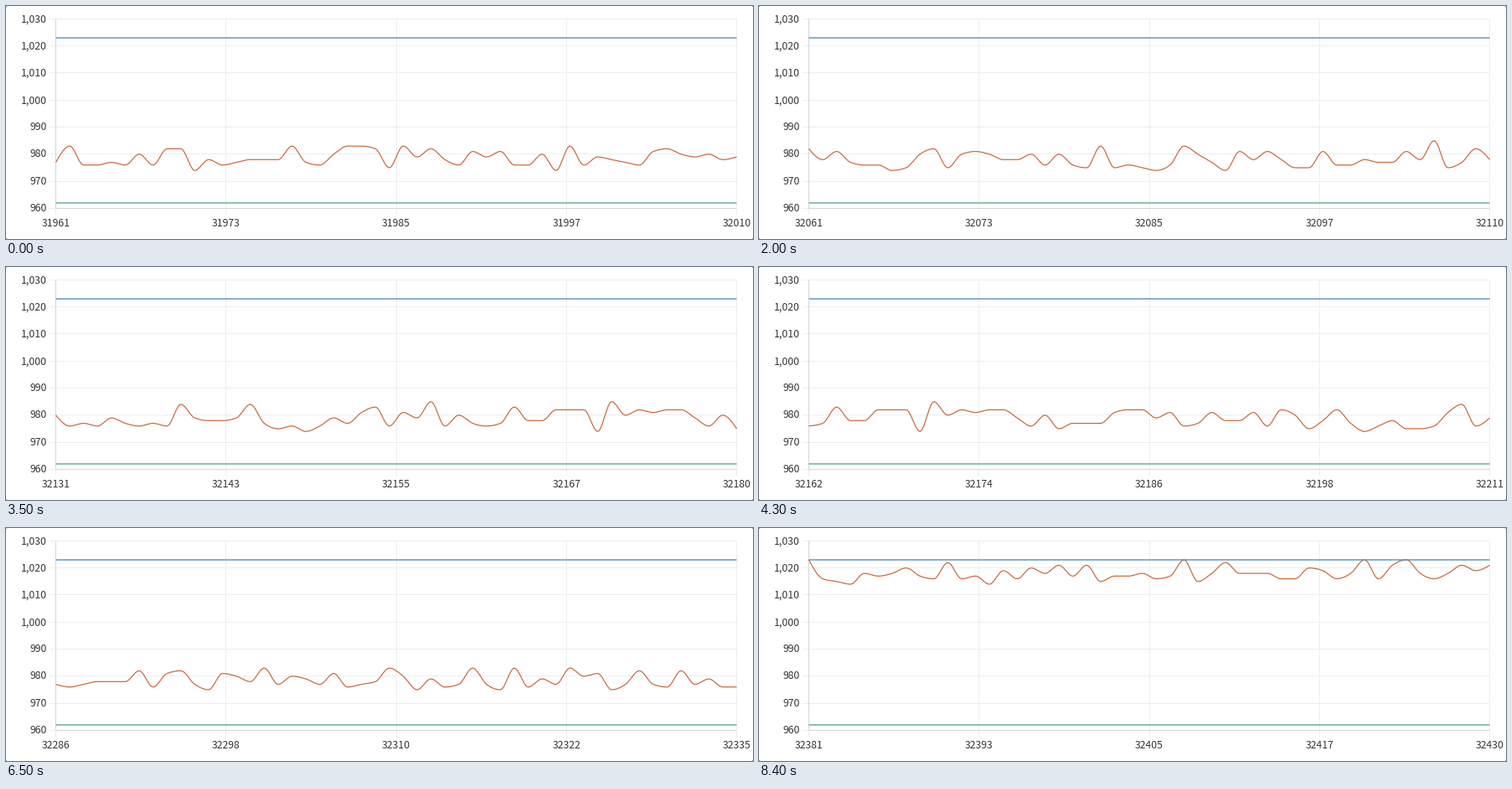
Write a matplotlib script that moves like this. It is 892x278 px and loops after 8.5 s.

```python
import numpy as np
import matplotlib.pyplot as plt
from matplotlib.animation import FuncAnimation
from matplotlib.patches import FancyBboxPatch

W, H, DPI = 892, 278, 64
PX = 72 / DPI                      # points per pixel
LEFT, RIGHT, TOP, BOTTOM = 59.5, 872.5, 15.4, 241.4
FRAMES, INTERVAL = 85, 100
FIRST, SPAN, COUNT = 31961, 49, 470
LOW, HIGH = 962, 1023              # limit lines
GRID, AXIS, INK = "#ebeeef", "#d3d7da", "#333538"
BLUE, ORANGE, GREEN = "#4a88b0", "#c8673a", "#52a28b"

plt.rcParams["font.family"] = "Noto Sans CJK JP"


def build_readings():
    """Sensor noise around a resting level that jumps up near the end."""
    rng = np.random.default_rng(12)
    k = np.arange(COUNT)
    level = np.interp(k, [399, 400, 401, 402, 403, 406],
                      [978, 982, 999, 1008, 1003, 1018])
    noise = rng.triangular(-4.4, -1.5, 7.4, COUNT)
    noise[(k >= 400) & (k <= 406)] = 0
    return np.minimum(np.rint(level + noise), HIGH)


def window_start(frame):
    """Sample at the left edge: about five per tick, with two short stalls."""
    ticks = [0, 13, 26, 32, 33, 37, 38, 43, 55, 84]
    shift = [0, 66, 130, 160, 160, 180, 180, 201, 275, 420]
    return int(round(np.interp(frame, ticks, shift)))


def y_px(value):
    return TOP + (1030 - value) * (BOTTOM - TOP) / 70


def crisp(pos):
    """Centre of the pixel that holds pos."""
    return np.floor(pos) + 0.5


def monotone(v, sub=12):
    """Monotone cubic through evenly spaced values."""
    d = np.diff(v)
    a, b = d[:-1], d[1:]
    inner = (np.sign(a) + np.sign(b)) * np.minimum(
        np.minimum(abs(a), abs(b)), abs(a + b) / 4)
    m = np.concatenate([[(3 * d[0] - inner[0]) / 2], inner,
                        [(3 * d[-1] - inner[-1]) / 2]])
    t = np.arange(sub)[None, :] / sub
    p0, p1, m0, m1 = (k[:, None] for k in (v[:-1], v[1:], m[:-1], m[1:]))
    y = ((2 * t**3 - 3 * t**2 + 1) * p0 + (t**3 - 2 * t**2 + t) * m0
         + (3 * t**2 - 2 * t**3) * p1 + (t**3 - t**2) * m1)
    return np.append(y.ravel(), v[-1])


def line(x, y, color, width=1.0, z=1):
    return ax.plot(x, y, color=color, lw=width * PX, zorder=z, snap=False,
                   solid_capstyle="butt", solid_joinstyle="round")[0]


def label(x, y, text, align):
    return ax.text(x, y, text, ha=align, va="baseline", color=INK,
                   fontsize=12.2 * PX, zorder=5)


fig = plt.figure(figsize=(W / DPI, H / DPI), dpi=DPI, facecolor="#6f7276")
ax = fig.add_axes([0, 0, 1, 1])
ax.set(xlim=(0, W), ylim=(H, 0))
ax.axis("off")
ax.add_patch(FancyBboxPatch((0, 0), W, H, fc="white", ec="none", zorder=0,
                            boxstyle="round,pad=0,rounding_size=2"))

# Grid, axes and labels
for value in range(960, 1031, 10):
    y = crisp(y_px(value))
    line([LEFT - 8, RIGHT], [y, y], GRID)
    label(49, y + 3.8, f"{value:,}", "right")
x_ticks = np.linspace(LEFT, RIGHT, 5)
for x in crisp(x_ticks):
    line([x, x], [TOP, BOTTOM + 8], GRID)
line([LEFT, LEFT], [TOP, BOTTOM], AXIS, z=2)
line([LEFT, RIGHT], [crisp(BOTTOM)] * 2, AXIS, z=2)
x_labels = [label(x, 263, "", "center") for x in x_ticks]

# Limits and readings
for limit, color in ((HIGH, BLUE), (LOW, GREEN)):
    line([LEFT, RIGHT], [y_px(limit)] * 2, color, 1.3, 4)
readings = build_readings()
curve_x = np.linspace(LEFT, RIGHT, SPAN * 12 + 1)
curve = line(curve_x, np.full_like(curve_x, y_px(978)), ORANGE, 1.2, 3)


def draw(frame):
    start = window_start(frame)
    curve.set_ydata(y_px(monotone(readings[start:start + SPAN + 1])))
    for k, text in enumerate(x_labels):
        text.set_text(str(FIRST + start + k * SPAN // 4))
    return [curve, *x_labels]


anim = FuncAnimation(fig, draw, frames=FRAMES, interval=INTERVAL,
                     repeat=True, repeat_delay=0, blit=False)
plt.show()
```
